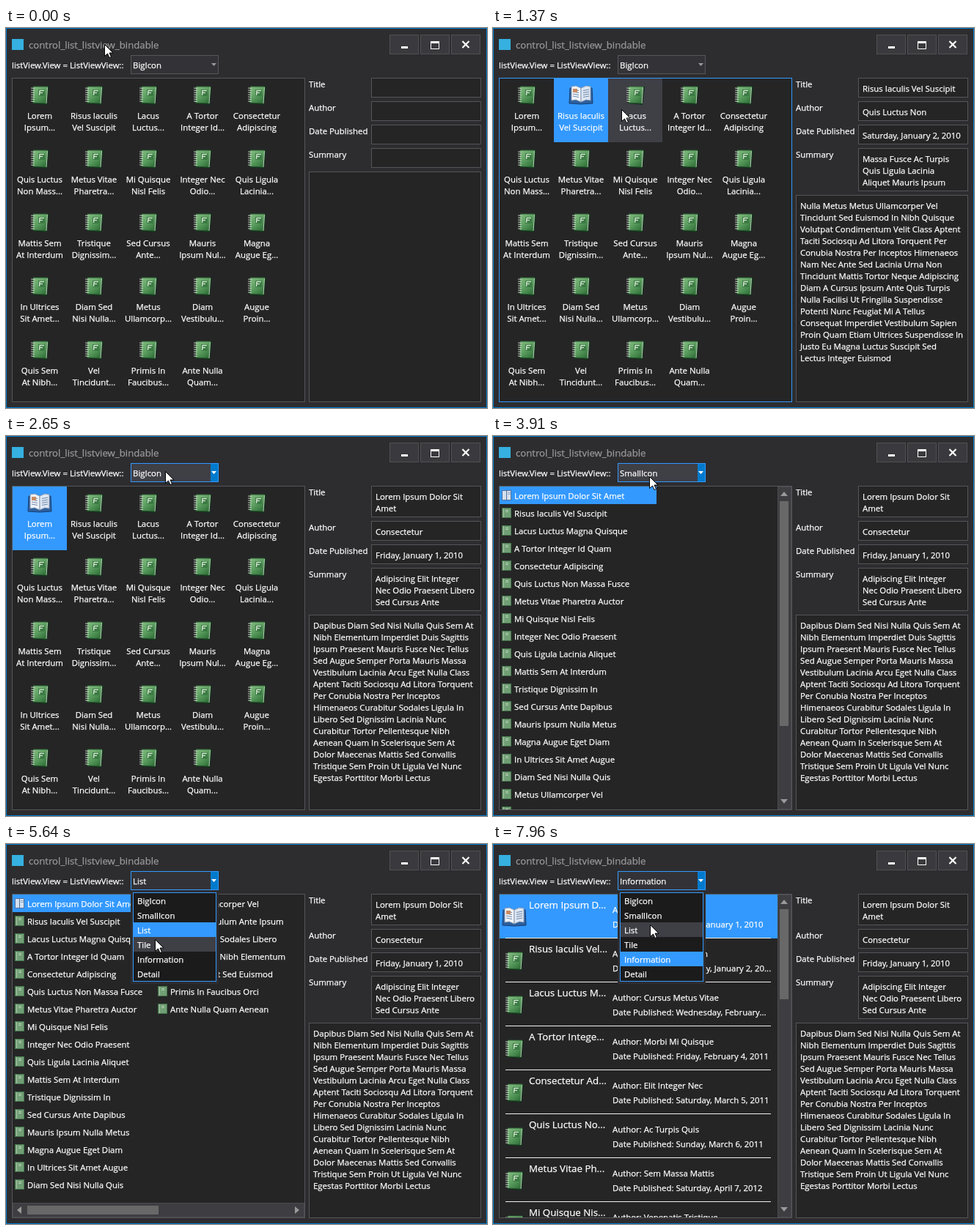
An HTML page with a canvas for the animation above (8000 ms loop, 656 by 519 pixels).

```html
<!DOCTYPE html>
<html lang="en">
<head>
<meta charset="utf-8">
<title>control_list_listview_bindable</title>
<style>
html, body { margin: 0; width: 100%; height: 100%; overflow: hidden; background: #2d2d30; }
canvas { display: block; }
</style>
</head>
<body>
<canvas id="stage" width="656" height="519"></canvas>
<script>
const ctx = document.getElementById('stage').getContext('2d');
const LOOP = 8000, CLICK_DELAY = 130;
const BLUE = '#3399ff', HOVER = '#3f3f46', PANEL = '#252526', EDGE = '#55555a', WHITE = '#fff', WINDOW = '#2d2d30';

const lines = s => s.split('|');
const titles = lines('Lorem Ipsum Dolor Sit Amet|Risus Iaculis Vel Suscipit|Lacus Luctus Magna Quisque|A Tortor Integer Id Quam|Consectetur Adipiscing|Quis Luctus Non Massa Fusce|Metus Vitae Pharetra Auctor|Mi Quisque Nisl Felis|Integer Nec Odio Praesent|Quis Ligula Lacinia Aliquet|Mattis Sem At Interdum|Tristique Dignissim In|Sed Cursus Ante Dapibus|Mauris Ipsum Nulla Metus|Magna Augue Eget Diam|In Ultrices Sit Amet Augue|Diam Sed Nisi Nulla Quis|Metus Ullamcorper Vel|Diam Vestibulum Ante Ipsum|Augue Proin Sodales Libero|Quis Sem At Nibh Elementum|Vel Tincidunt Sed Euismod|Primis In Faucibus Orci|Ante Nulla Quam Aenean');
const captions = 'Lorem|Ipsum...;Risus Iaculis|Vel Suscipit;Lacus|Luctus...;A Tortor|Integer Id...;Consectetur|Adipiscing;Quis Luctus|Non Mass...;Metus Vitae|Pharetra...;Mi Quisque|Nisl Felis;Integer Nec|Odio...;Quis Ligula|Lacinia...;Mattis Sem|At Interdum;Tristique|Dignissim...;Sed Cursus|Ante...;Mauris|Ipsum Nul...;Magna|Augue Eg...;In Ultrices|Sit Amet...;Diam Sed|Nisi Nulla...;Metus|Ullamcorp...;Diam|Vestibulu...;Augue|Proin...;Quis Sem|At Nibh...;Vel|Tincidunt...;Primis In|Faucibus...;Ante Nulla|Quam...'.split(';').map(lines);
const authors = lines('Consectetur|Quis Luctus Non|Cursus Metus Vitae|Morbi Mi Quisque|Elit Integer Nec|Ac Turpis Quis|Sem Massa Mattis|Venenatis Tristique');
const dates = lines('Friday, January 1, 2010|Saturday, January 2, 2010|Wednesday, February 3, 2010|Friday, February 4, 2011|Saturday, March 5, 2011|Sunday, March 6, 2011|Saturday, April 7, 2012|Sunday, April 8, 2012');
const views = ['BigIcon', 'SmallIcon', 'List', 'Tile', 'Information', 'Detail'];

// title, author, date, summary, body
const details = [
  ['Lorem Ipsum Dolor Sit|Amet', authors[0], dates[0],
   'Adipiscing Elit Integer|Nec Odio Praesent Libero|Sed Cursus Ante',
   'Dapibus Diam Sed Nisi Nulla Quis Sem At|Nibh Elementum Imperdiet Duis Sagittis|Ipsum Praesent Mauris Fusce Nec Tellus|Sed Augue Semper Porta Mauris Massa|Vestibulum Lacinia Arcu Eget Nulla Class|Aptent Taciti Sociosqu Ad Litora Torquent|Per Conubia Nostra Per Inceptos|Himenaeos Curabitur Sodales Ligula In|Libero Sed Dignissim Lacinia Nunc|Curabitur Tortor Pellentesque Nibh|Aenean Quam In Scelerisque Sem At|Dolor Maecenas Mattis Sed Convallis|Tristique Sem Proin Ut Ligula Vel Nunc|Egestas Porttitor Morbi Lectus'],
  [titles[1], authors[1], dates[1],
   'Massa Fusce Ac Turpis|Quis Ligula Lacinia|Aliquet Mauris Ipsum',
   'Nulla Metus Metus Ullamcorper Vel|Tincidunt Sed Euismod In Nibh Quisque|Volutpat Condimentum Velit Class Aptent|Taciti Sociosqu Ad Litora Torquent Per|Conubia Nostra Per Inceptos Himenaeos|Nam Nec Ante Sed Lacinia Urna Non|Tincidunt Mattis Tortor Neque Adipiscing|Diam A Cursus Ipsum Ante Quis Turpis|Nulla Facilisi Ut Fringilla Suspendisse|Potenti Nunc Feugiat Mi A Tellus|Consequat Imperdiet Vestibulum Sapien|Proin Quam Etiam Ultrices Suspendisse In|Justo Eu Magna Luctus Suscipit Sed|Lectus Integer Euismod'],
  [titles[2], authors[2], 'Wednesday, February 3,|2010',
   'Pharetra Auctor Sem|Massa Mattis Sem At|Interdum Magna Augue',
   'Eget Diam Vestibulum Ante Ipsum Primis|In Faucibus Orci Luctus Et Ultrices|Posuere Cubilia Curae Morbi Lacinia|Molestie Dui Praesent Blandit Dolor Sed|Non Quam In Vel Mi Sit Amet Augue|Congue Elementum Morbi In Ipsum Sit|Amet Pede Facilisis Laoreet Donec|Lacus Nunc Viverra Nec Blandit Vel|Egestas Et Augue Vestibulum Tincidunt|Malesuada Tellus Ut Ultrices Ultrices|Enim Curabitur Sit Amet Mauris Morbi In|Dui Quis Est Pulvinar Ullamcorper Nulla|Facilisi Integer Lacinia Sollicitudin|Massa Cras Metus Sed Aliquet Risus A|Tortor Integer Id Quam Morbi Mi Quisque|Nisl Felis Venenatis']
];

const popupRow = i => [174, 67 + i * 20, 112, 20];

// What the pointer goes to
const item = i => ({ kind: 'item', index: i, x: 46 + i * 74, y: 111 });
const row = (i, x = 206) => ({ kind: 'row', index: i, x, y: popupRow(i)[1] + 3 });
const combo = (x = 213, y = 55) => ({ kind: 'combo', x, y });

// Departure, arrival, goal
const script = [
  [120, 440, item(0)], [790, 950, item(1)], [1250, 1430, item(2)], [1700, 1990, item(0)],
  [2200, 2650, combo(217, 48)], [2960, 3220, row(1)],
  [3350, 3910, combo()], [4040, 4420, row(2)],
  [4600, 5140, combo()], [5280, 5640, row(3, 203)],
  [5880, 6340, combo()], [6690, 6940, row(4, 208)],
  [7160, 7480, combo()], [7620, 7960, row(2, 214)]
];

// Items are picked shortly after arrival, popup rows on departure.
function stateAt(t) {
  const s = { sel: -1, view: 0, popup: false, focus: '' };
  let x = 134, y = 22, picked = 0;
  for (const [start, end, goal] of script) {
    if (t < start) break;
    const p = Math.min(1, (t - start) / (end - start)), e = p * p * (3 - 2 * p);
    x += (goal.x - x) * e;
    y += (goal.y - y) * e;
    const clicked = t >= end + CLICK_DELAY;
    if (goal.kind === 'item' && clicked) {
      s.sel = goal.index;
      s.focus = 'list';
    } else if (goal.kind === 'combo') {
      s.view = picked;
      s.popup = clicked;
      if (p === 1) s.focus = 'combo';
    } else if (goal.kind === 'row') {
      picked = goal.index;
    }
  }
  s.mouse = [Math.round(x), Math.round(y)];
  return s;
}

function rect(x, y, w, h, fill) {
  ctx.fillStyle = fill;
  ctx.fillRect(x, y, w, h);
}
function box(x, y, w, h, fill, edge) {
  rect(x, y, w, h, edge);
  rect(x + 1, y + 1, w - 2, h - 2, fill);
}
function setFont(size) {
  ctx.font = size + 'px "Open Sans", "Noto Sans", sans-serif';
}
function text(s, x, y, size = 11.4, color = WHITE, align = 'left') {
  setFont(size);
  ctx.textAlign = align;
  ctx.fillStyle = ctx.strokeStyle = color;
  ctx.lineWidth = .25;
  ctx.fillText(s, x, y);
  ctx.strokeText(s, x, y);
}
function fit(s, width, size = 11.4) {
  setFont(size);
  if (ctx.measureText(s).width <= width) return s;
  while (ctx.measureText(s + '...').width > width) s = s.slice(0, -1).trim();
  return s + '...';
}
function poly(points, fill, stroke) {
  ctx.beginPath();
  for (let i = 0; i < points.length; i += 2) ctx.lineTo(points[i], points[i + 1]);
  ctx.closePath();
  ctx.fillStyle = fill;
  ctx.fill();
  if (stroke) {
    ctx.strokeStyle = stroke;
    ctx.lineWidth = 1;
    ctx.stroke();
  }
}
function line(x0, y0, x1, y1, color, width = 1) {
  ctx.strokeStyle = color;
  ctx.lineWidth = width;
  ctx.beginPath();
  ctx.moveTo(x0, y0);
  ctx.lineTo(x1, y1);
  ctx.stroke();
}
function local(x, y, draw) {
  ctx.save();
  ctx.translate(x, y);
  draw();
  ctx.restore();
}
// Triangle pointing up, turned by quarter circles
function arrow(x, y, turns, color, r = 5, h = 6) {
  local(x, y, () => {
    ctx.rotate(turns * Math.PI / 2);
    poly([0, -h / 2, r, h / 2, -r, h / 2], color);
  });
}
function within([x, y], [l, t, w, h]) {
  return x >= l && x < l + w && y >= t && y < t + h;
}

function notebook() {
  const green = ctx.createLinearGradient(6, 5, 25, 28);
  green.addColorStop(0, '#86bd83');
  green.addColorStop(.5, '#5c9f60');
  green.addColorStop(1, '#2c6b35');
  poly([7, 6, 29, 5, 26, 30, 6, 28], '#12331a');
  poly([7, 5, 27, 5, 25, 28, 6, 27], green, '#2a5c31');
  line(26.5, 6, 25, 28, '#b9cdb7');
  for (let y = 7; y < 28; y += 3) {
    line(4, y, 9, y + .5, '#c9d0c9', 1.2);
    line(4, y + 1.3, 7, y + 1.6, '#222', .9);
  }
  rect(14, 9, 9, 9, '#3c7a44');
  line(16, 10.5, 22, 10.5, '#d3e8d0', 1.4);
  line(16, 10, 15.5, 17, '#d3e8d0', 1.4);
  line(16, 13.5, 20, 13.5, '#d3e8d0', 1.2);
}
function openBook() {
  poly([1, 7, 31, 7, 32, 28, 16, 29, 0, 28], '#2c5f9e', '#173f75');
  for (const side of [-1, 1]) local(16, 0, () => {
    ctx.scale(side, 1);
    poly([0, 7, 7, 4, 13, 5, 13, 24, 7, 23, 0, 26], side < 0 ? '#f0f4fa' : '#dde7f3', '#8a9cb5');
    for (let y = 9; y < 21; y += 3) line(3, y + 1.5, 11, y, '#6d85a8');
  });
  rect(5, 8, 6, 5, '#c98a63');
}
function smallIcon(open) {
  box(0, 0, 13, 14, open ? '#d5e0ee' : '#719f75', open ? '#50739f' : '#45744b');
  rect(open ? 6 : 2, 1, 1, 12, open ? '#50739f' : '#a9c4a9');
  for (let y = 3; y < 6; y += 2) rect(open ? 8 : 5, y, 4, 1, open ? '#93a9c6' : '#b5d0b4');
}

function itemRect(view, i) {
  if (view === 0) return [9 + i % 5 * 74, 69 + (i / 5 | 0) * 87, 74, 87];
  if (view === 1) return [9, 69 + i * 24, 214, 24];
  if (view === 2) return [9 + (i / 17 | 0) * 195, 69 + i % 17 * 24, 195, 24];
  if (view === 3) return [9, 69 + i * 62, 230, 62];
  return [9, 69 + i * 60, 379, 60];
}

function drawItem(view, i, selected, hovered) {
  const [x, y, w, h] = itemRect(view, i);
  if (y > 510) return;
  if (selected || hovered) rect(x, y, w, h, selected ? BLUE : HOVER);
  const icon = selected ? openBook : notebook;
  if (view === 0) {
    local(x + 21, y + 6, icon);
    captions[i].forEach((s, n) => text(s, x + 37, y + 55 + n * 16, 11.4, WHITE, 'center'));
  } else if (view < 3) {
    local(x + 3, y + 5, () => smallIcon(selected));
    text(titles[i], x + 20, y + 17);
  } else if (view === 3) {
    local(x + 4, y + 15, icon);
    [titles[i], authors[i], dates[i]].forEach((s, n) => text(s, x + 41, y + 19 + n * 17));
  } else {
    local(x + 4, y + 14, icon);
    text(fit(titles[i], 107.8, 13.3), x + 40, y + 19, 13.3);
    text('Author: ' + authors[i], x + 154, y + 25);
    text(fit('Date Published: ' + dates[i], 216.7), x + 154, y + 45);
    rect(17, y + 59, 362, 1, '#f0f0f0');
  }
}

function drawScroll(view) {
  const track = '#3e3e42', edge = '#4a4a4f', thumb = '#686868', grey = '#999';
  if (view === 2) {
    box(9, 490, 398, 20, track, edge);
    rect(29, 494, 179, 12, thumb);
    arrow(18, 500, -1, grey);
    arrow(397, 500, 1, grey);
  } else if (view) {
    const pitch = itemRect(view, 0)[3];
    box(388, 69, 19, 441, track, edge);
    rect(391, 89, 12, Math.round(401 * 441 / (titles.length * pitch)), thumb);
    arrow(397, 79, 0, grey);
    arrow(397, 499, 2, grey);
  }
}

function drawList({ view, sel, mouse, focus, popup }) {
  box(8, 68, 400, 443, PANEL, focus === 'list' ? BLUE : EDGE);
  ctx.save();
  ctx.beginPath();
  ctx.rect(9, 69, 398, 441);
  ctx.clip();
  const over = !popup && within(mouse, [9, 69, view ? 379 : 398, 441]);
  titles.forEach((_, i) => drawItem(view, i, i === sel, over && within(mouse, itemRect(view, i))));
  drawScroll(view);
  ctx.restore();
}

function drawDetails({ sel }) {
  const fields = (details[sel] || Array(5).fill('')).map(lines);
  let y = 68;
  ['Title', 'Author', 'Date Published', 'Summary', ''].forEach((label, i) => {
    const x = label ? 498 : 413;
    const h = label ? 11 + 16 * fields[i].length : 511 - y;
    text(label, 413, y + 13);
    box(x, y, 648 - x, h, PANEL, EDGE);
    fields[i].forEach((s, n) => text(s, x + 6, y + 19 + n * 16));
    y += h + 5;
  });
}

function drawCombo({ view, mouse, focus, popup }) {
  const lit = !popup && within(mouse, [170, 37, 120, 26]), focused = focus === 'combo';
  box(170, 37, 120, 26, lit ? HOVER : '#333337', focused ? BLUE : EDGE);
  if (focused) rect(279, 38, 10, 24, '#007acc');
  arrow(283.5, 50, 2, focused ? WHITE : '#999', 3.5, 4);
  text(views[view], 173, 55);
}

function drawPopup({ view, mouse }) {
  rect(170, 63, 120, 128, WINDOW);
  box(173, 66, 114, 122, '#1b1b1c', BLUE);
  views.forEach((name, i) => {
    const area = popupRow(i);
    if (i === view) rect(...area, BLUE);
    else if (within(mouse, area)) rect(...area, HOVER);
    text(name, 179, area[1] + 15);
  });
}

function drawWindow() {
  box(0, 0, 656, 519, WINDOW, '#007acc');
  rect(8, 15, 16, 15, '#35b0e0');
  text('control_list_listview_bindable', 31, 28, 13.2, '#999');
  for (let i = 0; i < 3; i++) box(523 + i * 42, 9, 40, 27, '#3a3a3e', '#505054');
  rect(539, 25, 9, 3, WHITE);
  box(579, 18, 12, 11, '#3a3a3e', WHITE);
  rect(579, 18, 12, 3, WHITE);
  for (const d of [-4.5, 4.5]) line(627 - d, 18, 627 + d, 27, WHITE, 2.2);
  text('listView.View = ListViewView::', 8, 55);
}

function drawPointer([x, y]) {
  local(x + .5, y + .5, () =>
    poly([0, 0, 0, 16, 4, 12.5, 6.5, 18, 9, 17, 6.5, 11.5, 11.5, 11.5], WHITE, '#000'));
}

function draw(now) {
  const state = stateAt(now % LOOP);
  drawWindow();
  drawList(state);
  drawDetails(state);
  drawCombo(state);
  if (state.popup) drawPopup(state);
  drawPointer(state.mouse);
  requestAnimationFrame(draw);
}
requestAnimationFrame(draw);
</script>
</body>
</html>
```
